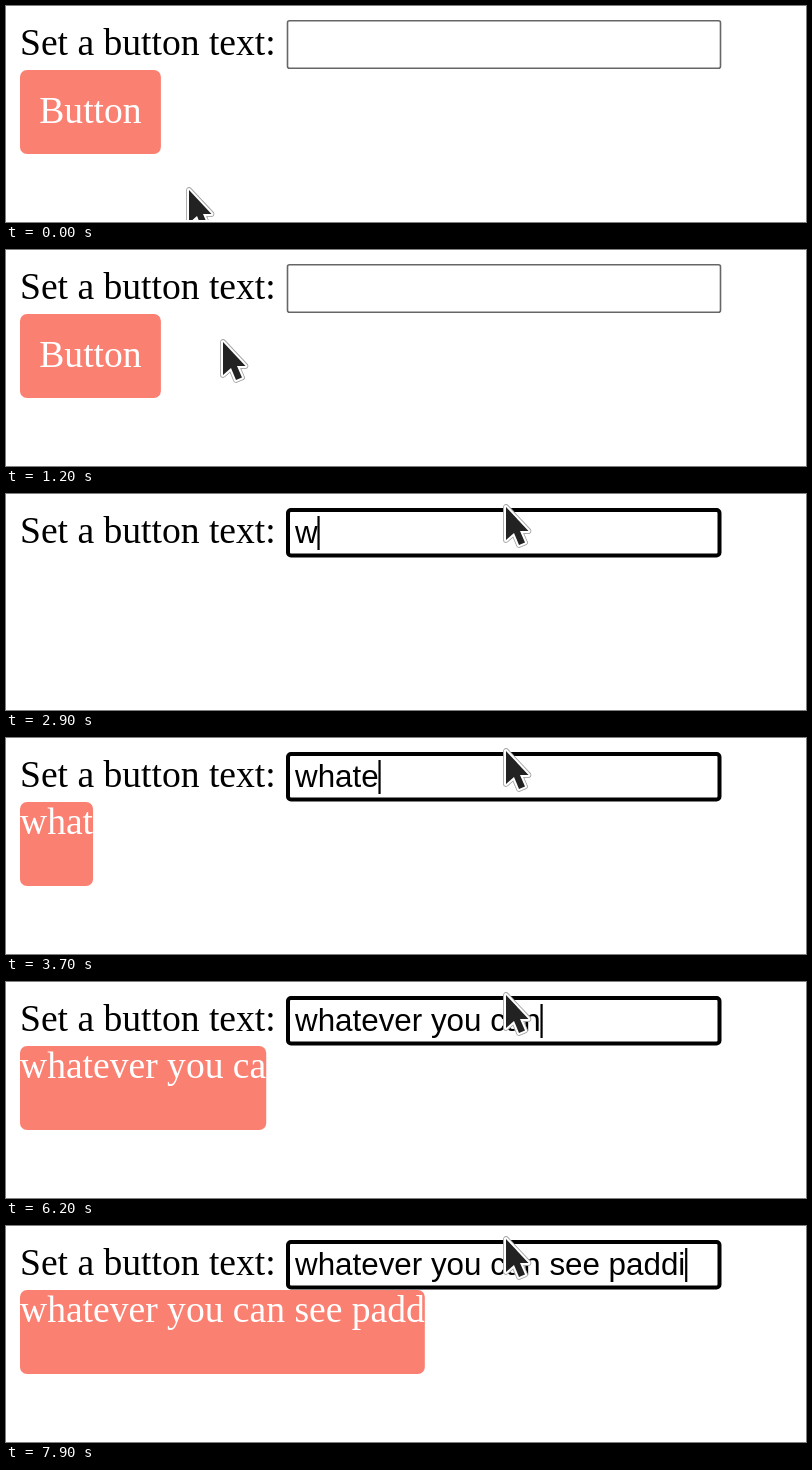
Write an HTML page that moves like this. It is 800 by 216 pixels and loops after 8 s.

```html
<!DOCTYPE html>
<html lang="en">
<head>
<meta charset="utf-8">
<title>Button text</title>
<style>
html, body { margin: 0; width: 100%; height: 100%; overflow: hidden; background: #fff; }
svg { display: block; }
text { white-space: pre; font: 37.6px "Liberation Serif", "Times New Roman", serif; }
#value { font: 31.35px "Liberation Sans", Arial, sans-serif; }
</style>
</head>
<body>
<svg width="800" height="214" viewBox="0 0 800 214">
  <text x="14" y="49">Set a button text:</text>
  <rect id="field" fill="#fff"/>
  <text id="value" x="289" y="49"></text>
  <rect id="caret" y="22" width="2.2" height="34"/>
  <rect id="button" x="14" y="64" height="84" rx="7" fill="#fa8072"/>
  <text id="label" fill="#fff"></text>
  <g id="pointer" stroke-linejoin="round">
    <path id="arrow" d="M2 4V37L10 30L15 42L21 39.5L16 28H24.5Z" fill="#222" stroke="#aaa" stroke-width="5.5" paint-order="stroke"/>
    <use href="#arrow"/>
    <path d="M2 4V37L10 30L15 42L21 39.5L16 28H24.5Z" fill="#222" stroke="#fff" stroke-width="4" paint-order="stroke"/>
  </g>
</svg>
<script>
const LOOP = 8000, STEP = 100, FOCUS = 1700;
const phrase = 'whatever you can see paddi';

// Time of each keystroke in tenths of a second
const keys = [29, 31, 32, 34, 37, 39, 40, 42, 53, 55, 56, 57, 60, 61, 61, 62,
  64, 65, 67, 68, 70, 72, 73, 76, 77, 79].map(k => k * STEP);

// Pointer stops: time, x, y
const path = [[0, 181, 180], [400, 208, 92], [800, 249, 1], [900, 236, 28],
  [1000, 216, 95], [1100, 207, 130], [1200, 215, 88], [1300, 272, 58], [1400, 325, 32]];

const $ = id => document.getElementById(id);
const set = (id, attrs) => {
  for (const name in attrs) $(id).setAttribute(name, attrs[name]);
};
const textWidth = id => $(id).textContent ? $(id).getComputedTextLength() : 0;

function pointerAt(t) {
  if (t >= 1900) return [498, 9];
  const i = path.findIndex(p => p[0] > t);
  if (i < 0) return path[path.length - 1].slice(1);
  const [t0, x0, y0] = path[i - 1], [t1, x1, y1] = path[i];
  const u = (t - t0) / (t1 - t0);
  return [x0 + (x1 - x0) * u, y0 + (y1 - y0) * u];
}

function drawField(focused) {
  set('field', focused
    ? { x: 282, y: 16, width: 431.5, height: 45.5, rx: 3, stroke: '#000', 'stroke-width': 4 }
    : { x: 281.5, y: 14.8, width: 433, height: 47.4, rx: 2, stroke: '#666', 'stroke-width': 1.6 });
}

function drawButton(count) {
  const pad = count ? 0 : 19.3;
  // The label trails the field by one character
  $('label').textContent = count ? phrase.slice(0, count - 1).trimEnd() : 'Button';
  set('label', { x: 14 + pad, y: pad ? 117 : 96 });
  set('button', { width: textWidth('label') + 2 * pad });
}

function draw(now) {
  const t = Math.floor(now % LOOP / STEP) * STEP;
  const count = keys.filter(k => k <= t).length;
  drawField(t >= FOCUS);
  $('value').textContent = phrase.slice(0, count);

  const blinkedOff = (t >= 2300 && t < 2900) || (t >= 4800 && t < 5300);
  set('caret', {
    x: 288.8 + textWidth('value') + (count ? 0 : 1),
    visibility: t >= FOCUS && !blinkedOff ? 'visible' : 'hidden'
  });

  drawButton(count);
  set('pointer', { transform: `translate(${pointerAt(t)})` });
}

const start = performance.now();
function tick() {
  draw(performance.now() - start);
  requestAnimationFrame(tick);
}
tick();
</script>
</body>
</html>
```
